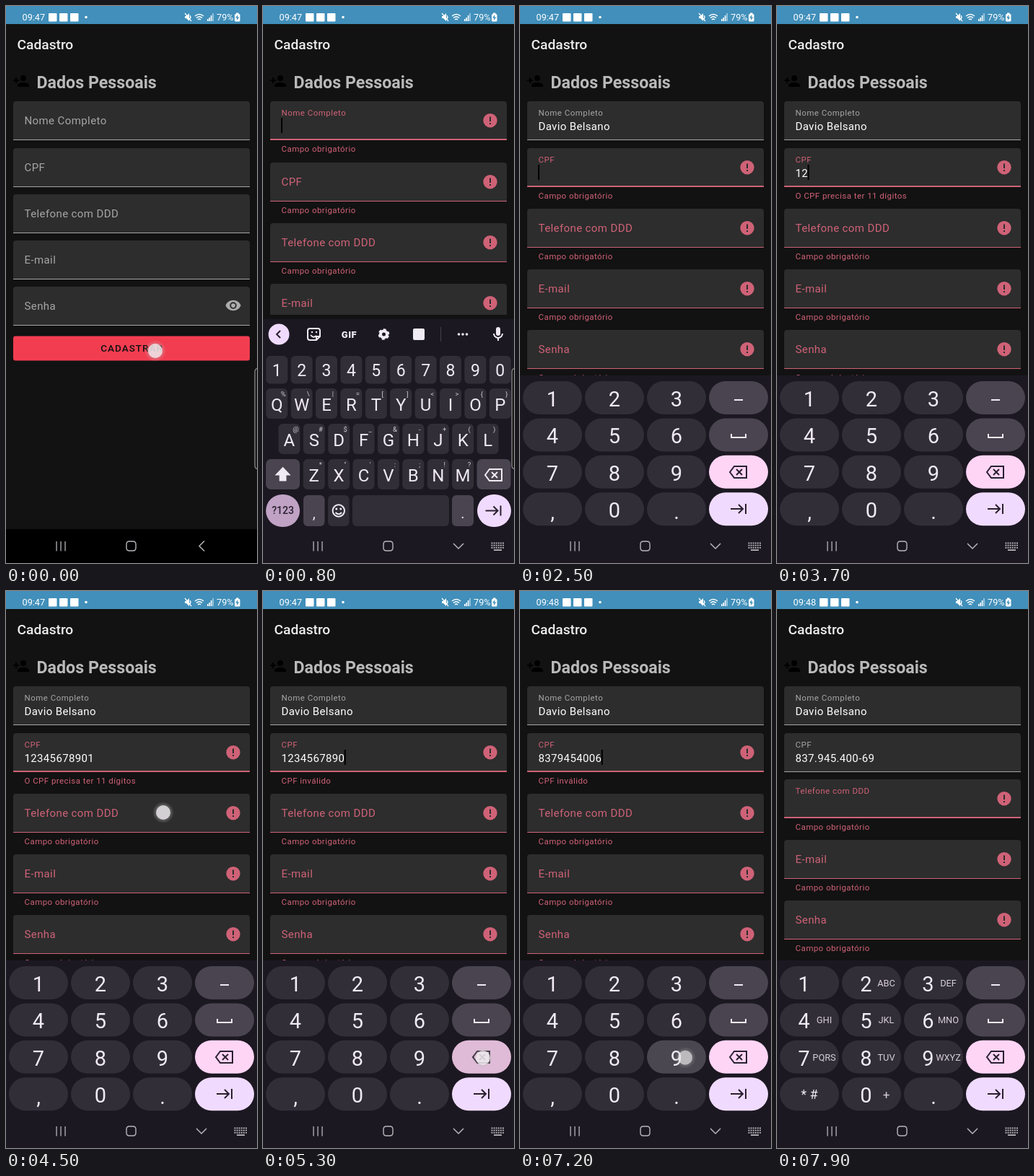
Animation of 348 by 772 pixels, one loop 8000 ms. Source, as an HTML page with a canvas:

```html
<!DOCTYPE html>
<html lang="pt-BR">
<head>
<meta charset="utf-8">
<title>Cadastro</title>
<style>
html, body { margin: 0; width: 100%; height: 100%; overflow: hidden; background: #121212; }
canvas { display: block; width: 348px; height: 772px; }
</style>
</head>
<body>
<canvas id="stage"></canvas>
<script>
const W = 348, H = 772, LOOP = 8000, STEP = 100;
const canvas = document.getElementById('stage');
const ratio = window.devicePixelRatio || 1;
canvas.width = W * ratio;
canvas.height = H * ratio;
const ctx = canvas.getContext('2d');

const APP = '#121212', ERROR = '#cf6277', GREY = '#a6a6a6', BOARD = '#1c1822', KEY = '#322e38',
      KEY_ALT = '#4a4450', LILAC = '#f0dbff', PINK = '#ffd5f5', INK = '#f0eaf4';

// ---------- Timeline ----------
const FULL_NAME = 'Davio Belsano';
const REQUIRED = 'Campo obrigatório';
const LABELS = ['Nome Completo', 'CPF', 'Telefone com DDD', 'E-mail', 'Senha'];

const steady = (text, start, step) => [...text].map((_, i) => start + i * step);
const RUNS = {
  name: { text: FULL_NAME, times: steady(FULL_NAME, 900, 90), hold: 45, dx: -14, dy: -5 },
  wrong: { text: '12345678901', times: steady('12345678901', 3600, 70), hold: 25, dx: 8, dy: 2 },
  right: {
    text: '83794540069', hold: 60, dx: 12, dy: 1,
    times: [6000, 6100, 6240, 6340, 6480, 6590, 6690, 6900, 7000, 7110, 7210]
  }
};
const FOCUS = [[0, -1], [500, 0], [2400, 1], [3100, 2], [3500, 1], [4600, 2], [4900, 1], [7500, 2]];
const CPF_ERROR = [[0, ''], [400, REQUIRED], [3100, 'O CPF precisa ter 11 dígitos'],
                   [4600, 'CPF inválido'], [7500, '']];
// start, end, x, y
const TOUCHES = [[0, 400, 207, 478], [2300, 2500, 318, 695], [3000, 3200, 305, 697],
                 [3300, 3500, 200, 231], [4400, 4700, 218, 307], [4800, 5000, 200, 231],
                 [5200, 5900, 305, 647], [7300, 7600, 218, 307]];
const ERASE = { start: 5250, step: 60, end: 5850 };

const clamp = (v, lo, hi) => Math.min(hi, Math.max(lo, v));
const valueAt = (list, t) => list.filter(([start]) => start <= t).pop()[1];
const typed = (run, t) => run.text.slice(0, run.times.filter(time => time <= t).length);

function cpfText(t, focused) {
  let digits = typed(RUNS.right, t);
  if (t < 6000) {
    const erased = clamp(Math.ceil((t - ERASE.start) / ERASE.step), 0, 11);
    const all = typed(RUNS.wrong, t);
    digits = all.slice(0, all.length - Math.min(erased, all.length));
  }
  return focused ? digits : digits.replace(/^(\d{3})(\d{3})(\d{3})(\d{2})$/, '$1.$2.$3-$4');
}

function lastEdit(t) {
  const times = [...FOCUS.map(f => f[0]), ...Object.values(RUNS).flatMap(r => r.times)];
  if (t >= ERASE.start) times.push(Math.min(t, ERASE.end));
  return Math.max(...times.filter(time => time <= t));
}

function keyCentre(char) {
  if ('0123456789'.includes(char)) {
    const n = +char - 1;
    return char === '0' ? [131, 697] : [45 + n % 3 * 86, 543 + Math.floor(n / 3) * 51.4];
  }
  if (char === ' ') return [191, 699];
  for (const [letters, x, y] of LETTER_ROWS) {
    const i = letters.indexOf(char.toLowerCase());
    if (i >= 0) return [x + i * 34.4, y];
  }
}

function touchAt(t) {
  for (const [start, end, x, y] of TOUCHES)
    if (t >= start && t < end) return { x, y, down: true, alpha: t >= end - 100 ? 0.4 : 0.78 };
  for (const run of Object.values(RUNS)) {
    const i = run.times.findIndex(time => Math.abs(t - time) < run.hold);
    if (i < 0) continue;
    const [x, y] = keyCentre(run.text[i]);
    const down = t < run.times[i];
    return { x: x + run.dx, y: y + run.dy, down, alpha: down ? 0.6 : 0.22 };
  }
  return null;
}

// ---------- Drawing helpers ----------
function text(str, x, y, size, color, { weight = 400, align = 'left', spacing = 0 } = {}) {
  ctx.font = `${weight} ${size}px Roboto, sans-serif`;
  ctx.letterSpacing = spacing + 'px';
  ctx.textAlign = align;
  ctx.fillStyle = color;
  ctx.fillText(str, x, y);
  return ctx.measureText(str).width;
}
const centred = (str, x, y, size, color = INK, options = {}) =>
  text(str, x, y + size * 0.355, size, color, { align: 'center', ...options });

function rect(x, y, w, h, color, radius = 0) {
  ctx.fillStyle = color;
  ctx.beginPath();
  ctx.roundRect(x, y, w, h, radius);
  ctx.fill();
}
function disc(x, y, r, color) {
  ctx.fillStyle = color;
  ctx.beginPath();
  ctx.arc(x, y, r, 0, 7);
  ctx.fill();
}
function shape(d, x, y, color, scale = 1) {
  ctx.save();
  ctx.translate(x, y);
  ctx.scale(scale, scale);
  ctx.fillStyle = color;
  ctx.fill(new Path2D(d), 'evenodd');
  ctx.restore();
}
function line(d, color, width = 2, x = 0, y = 0) {
  ctx.save();
  ctx.translate(x, y);
  ctx.strokeStyle = color;
  ctx.lineWidth = width;
  ctx.stroke(new Path2D(d));
  ctx.restore();
}

const PERSON = 'M15 12a4 4 0 1 0 0-8 4 4 0 0 0 0 8zM6 10V7H4v3H1v2h3v3h2v-3h3v-2zM15 14c-2.7 0-8 1.3-8 4v2h16v-2c0-2.7-5.3-4-8-4z';
const EYE = 'M12 4.5C7 4.5 2.7 7.6 1 12c1.7 4.4 6 7.5 11 7.5s9.3-3.1 11-7.5c-1.7-4.4-6-7.5-11-7.5zM12 17a5 5 0 1 1 0-10 5 5 0 0 1 0 10zM12 9a3 3 0 1 0 0 6 3 3 0 0 0 0-6z';
const MIC = 'M12 14a3 3 0 0 0 3-3V5a3 3 0 0 0-6 0v6a3 3 0 0 0 3 3zM17 11a5 5 0 0 1-10 0H5a7 7 0 0 0 6 6.9V21h2v-3.1A7 7 0 0 0 19 11z';
const BACKSPACE = 'M-12 0l6-8H11V8H-6zM-3-4L5 4M5-4L-3 4';
const TAB = 'M-11 0H6M0-6l6 6-6 6M10-7V7';

// ---------- Screen parts ----------
function statusBar(t) {
  rect(0, 0, W, 25, '#418fba');
  text(t < 6500 ? '09:47' : '09:48', 22.5, 20, 12.7, '#fff');
  [59, 74, 89].forEach(x => rect(x, 10, 11.5, 11.5, '#fff', 1));
  disc(111, 15.5, 1.8, '#fff');
  shape('M0 4h2l4-4v11l-4-4H0z', 248, 10, '#fff');
  line('M248 10l9 11M255 13q2 2.5 0 5', '#fff', 1.2);
  line('M262 14q6-5 12 0M264 16.5q4-3.5 8 0M266 19q2-2 4 0', '#fff', 1.5);
  [3, 5, 8, 11].forEach((h, i) => rect(279 + i * 2.4, 21 - h, 1.6, h, i < 3 ? '#fff' : '#a9cfe4'));
  text('79%', 292, 20, 12.7, '#fff');
  rect(319, 9.5, 3.5, 2, '#fff');
  rect(317, 11, 7.5, 10.5, '#fff', 1.5);
  shape('M4 0L0 5h2.5L2 9l4-5H3.5z', 318, 12, '#418fba', 0.9);
}

function field(i, top, { value, error, focused, cursor, composing }) {
  const color = error ? ERROR : GREY;
  const thick = focused ? 2 : 1;
  rect(10, top, 328, 54, '#2d2d2d', [4, 4, 0, 0]);
  rect(10, top + 54 - thick, 328, thick, color);

  if (focused || value) {
    text(LABELS[i], 25.5, top + 20.3, 11.5, color, { spacing: 0.48 });
    const width = text(value, 25.5, top + 39.7, 15, '#fff', { spacing: 0.35 });
    if (composing) {
      const before = ctx.measureText(value.slice(0, -composing.length)).width;
      rect(25.5 + before, top + 41.5, width - before, 1, '#fff');
    }
    if (cursor) rect(25 + width, top + 23, 2, 21, '#000');
  } else {
    text(LABELS[i], 25.5, top + 31.7, 15, color, { spacing: 0.4 });
  }

  if (error) {
    disc(315, top + 26.7, 9.7, ERROR);
    rect(314, top + 21.5, 2, 6.5, '#2d2d2d');
    rect(314, top + 30, 2, 2, '#2d2d2d');
    text(error, 25.5, top + 70.2, 11.5, ERROR, { spacing: 0.45 });
  } else if (i === 4) {
    shape(EYE, 303.5, top + 14.5, '#adadad', 0.96);
  }
}

function form(t, focus, name, composing, touch) {
  text('Cadastro', 15.5, 59.5, 19.2, '#ececec', { weight: 500 });
  shape(PERSON, 9, 92, '#000');
  text('Dados Pessoais', 42.5, 114, 23.2, '#b9b9b9', { weight: 700 });

  const blink = (t - lastEdit(t)) % 800 < 400;
  const cursor = blink && !(touch && touch.y < 430);
  const required = t >= 400 ? REQUIRED : '';
  const values = [name, cpfText(t, focus === 1), '', '', ''];
  const errors = [t < 2400 ? required : '', valueAt(CPF_ERROR, t), required, required, required];

  let top = 132;
  LABELS.forEach((_, i) => {
    field(i, Math.round(top), {
      value: values[i], error: errors[i], focused: focus === i, cursor: cursor && focus === i,
      composing: focus === 0 && i === 0 ? composing : ''
    });
    top += (i < 2 ? 64.5 : 63.8) + (errors[i] ? 20 : 0);
  });
  rect(10, top + 5, 328, 34, '#f23d51', 3);
  centred('CADASTRAR', 174.5, top + 22, 13.5, '#111', { weight: 500, spacing: 1 });
}

const LETTER_ROWS = [['qwertyuiop', 19.2, 551], ['asdfghjkl', 36.4, 600], ['zxcvbnm', 70.7, 649]];
const HINTS = ['%\\|=[]<>{}', '@#$_&-+()', '*"\':;!?'];

// Builds a key painter that lightens the key under a pressed finger.
const keyPainter = touch => (x, y, w, h, color, radius) => {
  rect(x, y, w, h, color, radius);
  if (touch && touch.down && touch.x >= x && touch.x <= x + w && touch.y >= y && touch.y <= y + h)
    rect(x, y, w, h, color === KEY ? 'rgba(255,255,255,.12)' : 'rgba(0,0,0,.12)', radius);
};

function toolbar() {
  line('M3-5l-5 5 5 5', '#2a2030', 2, 21, 455);
  line('M65 447h11q3 0 3 3v8l-5 5h-9q-3 0-3-3v-10q0-3 3-3zM66 456q4 5 8 1M74 463v-5h5', INK, 2);
  disc(68, 452, 1.2, INK);
  disc(74, 452, 1.2, INK);
  centred('GIF', 119.5, 455, 13, INK, { weight: 900, spacing: 0.5 });
  ctx.save();
  line('M172 455a4.5 4.5 0 1 0-9 0 4.5 4.5 0 1 0 9 0', INK, 4);
  ctx.setLineDash([3.8, 3]);
  line('M174 455a6.5 6.5 0 1 0-13 0 6.5 6.5 0 1 0 13 0', INK, 2.6);
  ctx.restore();
  rect(208, 447, 16, 16, INK, 2);
  rect(246, 445, 1, 20, '#45404b');
  [271.5, 277, 282.5].forEach(x => disc(x, 455, 1.8, INK));
}

function suggestions(word, full) {
  line('M-2-5l5 5-5 5', '#2a2030', 2, 21, 455);
  [word || 'e', full, full.slice(0, -1)].forEach((s, i) => centred(s, 83 + i * 89.5, 456.5, 18));
  [126, 217.5].forEach(x => rect(x, 444, 1, 24, '#45404b'));
}

function letterBoard(name, word, touch) {
  const key = keyPainter(touch);
  const upper = !word;
  rect(0, 434, W, 344, BOARD);
  disc(22, 455, 14.5, LILAC);
  if (name) suggestions(word, FULL_NAME.split(' ')[name.includes(' ') ? 1 : 0]);
  else toolbar();
  shape(MIC, 314, 443, INK);

  [...'1234567890'].forEach((digit, i) => {
    const x = 19.2 + i * 34.4;
    key(x - 15, 485, 30, 38.5, KEY, 6);
    centred(digit, x, 504.5, 23);
  });
  LETTER_ROWS.forEach(([letters, x0, y], row) => [...letters].forEach((letter, i) => {
    const x = x0 + i * 34.4;
    key(x - 15, y - 21, 30, 42, KEY, 6);
    centred(upper ? letter.toUpperCase() : letter, x, y + 1, 24);
    centred(HINTS[row][i], x + 9, y - 13.5, 9.5, '#d0c8d4');
  }));

  key(4, 628, 47, 42, KEY_ALT, 7);
  const arrow = 'M27.5 640l-9 9.5h5v8h8v-8h5z';
  if (upper) shape(arrow, 0, 0, INK);
  line(arrow, INK, 1.8);
  key(296.5, 628, 47, 42, KEY_ALT, 7);
  line(BACKSPACE, INK, 2, 320, 650);

  key(4, 677, 47, 45, '#bfa2c4', 22.5);
  centred('?123', 27.5, 699.5, 14, '#2a2030', { weight: 500 });
  key(56, 678, 29.5, 43, KEY_ALT, 6);
  key(90, 678, 29.5, 43, KEY, 6);
  key(124, 678, 134, 43, KEY, 6);
  key(262, 678, 30, 43, KEY_ALT, 6);
  centred(',', 70.7, 703, 20);
  centred('.', 277, 703, 20);
  line('M113 699.5a8.2 8.2 0 1 0-16.4 0 8.2 8.2 0 1 0 16.4 0M100.5 702q4.5 4.5 8.500 0', INK, 2);
  disc(101.8, 697, 1.5, INK);
  disc(107.8, 697, 1.5, INK);
  key(297, 677, 47, 45, LILAC, 22.5);
  line(TAB, '#2a2030', 2, 319.5, 699.5);
}

function numberBoard(phone, touch) {
  const key = keyPainter(touch);
  const groups = ['', 'ABC', 'DEF', 'GHI', 'JKL', 'MNO', 'PQRS', 'TUV', 'WXYZ', '', '+', ''];
  const sideColors = [KEY_ALT, KEY_ALT, PINK, LILAC];
  rect(0, 512, W, 260, BOARD);
  [...'123456789,0.'].forEach((char, i) => {
    const x = 4 + i % 3 * 86, y = 520 + Math.floor(i / 3) * 51.4;
    key(x, y, 82, 46, KEY, 23);
    if (phone && char === ',') return centred('* #', x + 41, y + 23.5, 18);
    const shifted = phone && char !== '.';
    const low = ',.'.includes(char) ? 4 : 1.5;
    centred(char, x + (shifted ? 33.5 : 41), y + 23 + low, 29);
    if (shifted) centred(groups[i], x + 61.5, y + 23.5, groups[i] === '+' ? 17 : 12.8, '#d6ced9');
  });
  sideColors.forEach((color, row) => key(262, 520 + row * 51.4, 82, 46, color, 23));
  line('M297 546h12', INK, 2);
  line('M293 593v5h20v-5', INK, 2);
  line(BACKSPACE, '#2a2030', 2, 303, 646);
  line(TAB, '#2a2030', 2, 303, 697);
}

function navigation(keyboard) {
  rect(0, 725, W, 47, keyboard ? BOARD : '#000');
  const color = '#b8b5ba';
  [70, 76, 82].forEach(x => rect(x - 0.6, 742, 1.3, 13.5, color));
  line('M171 742h5q4 0 4 4v5q0 4-4 4h-5q-4 0-4-4v-5q0-4 4-4z', color, 1.4);
  if (!keyboard) return line('M275 741.5l-7 7 7 7', color, 1.5);
  line('M264 745l7 7 7-7', color, 1.5);
  for (let row = 0; row < 3; row++)
    for (let col = 0; col < 6; col++) rect(316.5 + col * 3.1, 743.5 + row * 3.2, 1.9, 1.9, color);
  rect(320, 753.2, 11, 1.8, color);
}

function edgeHandle() {
  const outline = 'M349 502.5q-4 0-4 5v129q0 5 4 5';
  shape(outline, 0, 0, '#1a1a1a');
  line(outline, '#8f8f8f', 1.2);
}

function touchMark({ x, y, alpha }) {
  ctx.save();
  ctx.globalAlpha = alpha;
  const halo = ctx.createRadialGradient(x, y, 9, x, y, 15);
  halo.addColorStop(0, 'rgba(190,190,190,.5)');
  halo.addColorStop(1, 'rgba(190,190,190,0)');
  disc(x, y, 15, halo);
  disc(x, y, 10, '#f2eef2');
  ctx.restore();
}

function draw(t) {
  const focus = valueAt(FOCUS, t);
  const name = typed(RUNS.name, t);
  const word = name.split(' ').pop();
  const touch = touchAt(t);
  const keyboard = focus >= 0;

  ctx.setTransform(ratio, 0, 0, ratio, 0, 0);
  rect(0, 0, W, H, APP);
  form(t, focus, name, word, touch);
  statusBar(t);
  if (focus === 0) {
    // The app shrinks at once; the board slides up and settles 6px above its layout position.
    const remaining = 1 - clamp((t - 400) / 500, 0, 1);
    rect(0, 428, W, 344, APP);
    ctx.save();
    ctx.translate(0, Math.round(300 * remaining ** 2.4) - 6);
    letterBoard(name, word, touch);
    ctx.restore();
  } else if (keyboard) {
    numberBoard(focus === 2, touch);
  }
  navigation(keyboard);
  if (t < 1000) edgeHandle();
  if (touch) touchMark(touch);
}

function frame() {
  draw(Math.floor(performance.now() % LOOP / STEP) * STEP);
  requestAnimationFrame(frame);
}
frame();
</script>
</body>
</html>
```
